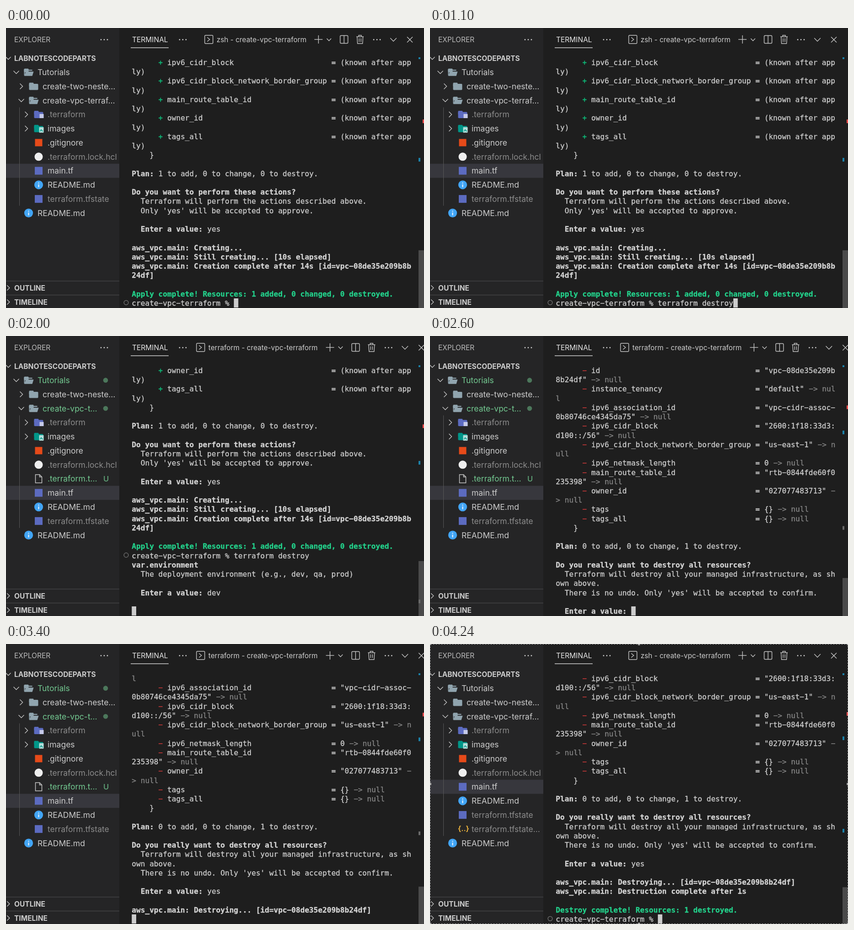
Recreate the animation shown at these times as an HTML page with a canvas. Size 915x612 px, loop 4.39 s.

```html
<!DOCTYPE html>
<html lang="en">
<head>
<meta charset="utf-8">
<title>Terminal session</title>
<style>
  html, body { margin: 0; width: 100%; height: 100%; overflow: hidden; background: #1e1e1e; }
  canvas { display: block; }
</style>
</head>
<body>
<canvas id="stage" width="915" height="612"></canvas>
<script>
const W = 915, H = 612, LOOP = 4390;
const ctx = document.getElementById('stage').getContext('2d');
const SANS = 'Inter, "Open Sans", sans-serif';
const MONO = '"DejaVu Sans Mono", "Liberation Mono", monospace';

// Terminal grid
const COLS = 63, ROWS = 27, CELL = 9.717, LINE = 20.23, LEFT = 275.3, TOP = 65;
const STYLES = {
  n: ['', '#d0d0d0'], b: ['bold ', '#d4d4d4'], g: ['bold ', '#23d18b'],
  p: ['', '#0dbc79'], r: ['', '#d23b3b'], d: ['', '#868686']
};

// Markup: "§" and a letter switch the text style.
const bold = s => `§b${s}§n`;
const ID = 'vpc-08de35e209b8b24df';
const PROMPT = 'create-vpc-terraform % ';
const ASK = `  ${bold('Enter a value:')} `;
const attr = (sign, name, value) => `      ${sign}§n ${name.padEnd(36)} = ${value}\n`;
const added = name => attr('§p+', name, '(known after apply)');
const removed = (name, value) => attr('§r-', name, `${value} §d-> null§n`);

const created =
  ['ipv6_cidr_block', 'ipv6_cidr_block_network_border_group', 'main_route_table_id',
    'owner_id', 'tags_all'].map(added).join('') +
  `    }\n\n${bold('Plan:')} 1 to add, 0 to change, 0 to destroy.\n\n` +
  bold('Do you want to perform these actions?') + '\n' +
  '  Terraform will perform the actions described above.\n' +
  "  Only 'yes' will be accepted to approve.\n\n" + ASK + 'yes\n\n' +
  bold('aws_vpc.main: Creating...') + '\n' +
  bold('aws_vpc.main: Still creating... [10s elapsed]') + '\n' +
  bold(`aws_vpc.main: Creation complete after 14s [id=${ID}]`) + '\n\n' +
  '§gApply complete! Resources: 1 added, 0 changed, 0 destroyed.§n\n' + PROMPT;

const destroyPlan =
  removed('id', `"${ID}"`) +
  removed('instance_tenancy', '"default"') +
  removed('ipv6_association_id', '"vpc-cidr-assoc-0b80746ce4345da75"') +
  removed('ipv6_cidr_block', '"2600:1f18:33d3:d100::/56"') +
  removed('ipv6_cidr_block_network_border_group', '"us-east-1"') +
  removed('ipv6_netmask_length', '0') +
  removed('main_route_table_id', '"rtb-0844fde60f0235398"') +
  removed('owner_id', '"027077483713"') +
  removed('tags', '{}') + removed('tags_all', '{}') +
  `    }\n\n${bold('Plan:')} 0 to add, 0 to change, 1 to destroy.\n\n` +
  bold('Do you really want to destroy all resources?') + '\n' +
  '  Terraform will destroy all your managed infrastructure, as shown above.\n' +
  "  There is no undo. Only 'yes' will be accepted to confirm.\n\n" + ASK;

// Output and keystrokes as [time, text]
const script = [[0, created]];
function type(text, start, end) {
  const steps = (end - start) / 100 + 1;
  for (let i = 0; i < steps; i++) {
    const at = k => Math.ceil(text.length * k / steps);
    script.push([start + i * 100, text.slice(at(i), at(i + 1))]);
  }
}
const print = (time, text) => script.push([time, text]);

type('terraform destroy', 100, 1100);
print(1200, '\n');
print(1300, bold('var.environment') + '\n' +
  '  The deployment environment (e.g., dev, qa, prod)\n\n' + ASK);
type('dev', 1400, 1600);
print(1700, '\n\n');
print(2100, bold(`aws_vpc.main: Refreshing state... [id=${ID}]`) + '\n');
print(2600, destroyPlan);
type('yes', 2700, 2900);
print(3100, '\n\n');
print(3300, bold(`aws_vpc.main: Destroying... [id=${ID}]`) + '\n');
print(3500, bold('aws_vpc.main: Destruction complete after 1s') + '\n');
print(3600, '\n§gDestroy complete! Resources: 1 destroyed.§n\n' + PROMPT);

// Turns markup into rows of styled runs, wrapped at the terminal width.
function layout(text) {
  const rows = [];
  let style = 'n', row, col;
  const newRow = () => { row = []; col = 0; rows.push(row); };
  newRow();
  for (let i = 0; i < text.length; i++) {
    const ch = text[i];
    if (ch === '§') { style = text[++i]; continue; }
    if (ch === '\n') { newRow(); continue; }
    if (col === COLS) newRow();
    let run = row[row.length - 1];
    if (!run || run.style !== style) row.push(run = { col, style, text: '' });
    run.text += ch;
    col++;
  }
  return { rows, col };
}

// Drawing helpers
function rect(x, y, w, h, color) {
  ctx.fillStyle = color;
  ctx.fillRect(x, y, w, h);
}
function text(s, x, y, font, color) {
  ctx.font = font;
  ctx.fillStyle = color;
  ctx.fillText(s, x, y);
}
// Terminal text: slightly heavier, with wide hyphens
function mono(s, x, y, weight, color) {
  const wide = s.replace(/-/g, '\u2212');
  text(wide, x, y, `${weight}16.14px ${MONO}`, color);
  ctx.strokeStyle = color;
  ctx.lineWidth = 0.3;
  ctx.strokeText(wide, x, y);
}
function disc(x, y, r, color) {
  ctx.fillStyle = color;
  ctx.beginPath();
  ctx.arc(x, y, r, 0, 7);
  ctx.fill();
}
function path(points, color = '#c5c5c5', width = 1.4, closed = false) {
  ctx.strokeStyle = color;
  ctx.lineWidth = width;
  ctx.beginPath();
  points.forEach(([x, y]) => ctx.lineTo(x, y));
  if (closed) ctx.closePath();
  ctx.stroke();
}
function box(x, y, w, h, r) {
  ctx.strokeStyle = '#c5c5c5';
  ctx.lineWidth = 1.4;
  ctx.beginPath();
  ctx.roundRect(x, y, w, h, r);
  ctx.stroke();
}
function block(x, y, w, h, r, color) {
  ctx.fillStyle = color;
  ctx.beginPath();
  ctx.roundRect(x, y, w, h, r);
  ctx.fill();
}
const down = (x, y, s) => path([[x - s, y - s / 2], [x, y + s / 2], [x + s, y - s / 2]]);
const right = (x, y, s) => path([[x - s / 2, y - s], [x + s / 2, y], [x - s / 2, y + s]]);
function dots(x, y) {
  for (let i = -1; i <= 1; i++) disc(x + i * 7, y, 1.4, '#c5c5c5');
}

// Explorer icons, centred on x, y
function folder(x, y, color, open) {
  block(x - 10, y - 8, 10, 8, 1.5, color);
  if (!open) return block(x - 10, y - 5.5, 20, 13.5, 1.8, color);
  rect(x - 10, y - 5.5, 18, 2.2, color);
  rect(x - 10, y - 6, 2, 13, color);
  ctx.fillStyle = color;
  ctx.beginPath();
  [[-6, -1.5], [11, -1.5], [8, 8], [-9.5, 8]].forEach(([dx, dy]) => ctx.lineTo(x + dx, y + dy));
  ctx.fill();
}
const icons = {
  dir: (x, y) => folder(x, y, '#90a4ae'),
  open: (x, y) => folder(x, y, '#90a4ae', true),
  modules: (x, y) => {
    folder(x, y, '#5c6bc0');
    rect(x + 2, y - 1, 9, 9, '#c5cae9');
  },
  pictures: (x, y) => {
    folder(x, y, '#009688');
    block(x + 1, y - 3, 10, 12, 1, '#b2dfdb');
    path([[x + 3, y + 6], [x + 5.5, y + 2.5], [x + 7, y + 4.5], [x + 9, y + 6]], '#009688', 1.6);
  },
  git: (x, y) => rect(x - 8, y - 8, 16, 16, '#e64a19'),
  lock: (x, y) => disc(x, y, 9, '#eeeeee'),
  tf: (x, y) => rect(x - 8.5, y - 8.5, 17, 17, '#5c6bc0'),
  info: (x, y) => {
    disc(x, y, 9.6, '#42a5f5');
    rect(x - 1, y - 5, 2, 2, '#f2f6fa');
    rect(x - 1, y - 1, 2, 6, '#f2f6fa');
  },
  file: (x, y) => {
    path([[x - 7, y - 9], [x + 2, y - 9], [x + 7, y - 4], [x + 7, y + 9], [x - 7, y + 9]], '#c5c5c5', 1.5, true);
    path([[x + 2, y - 9], [x + 2, y - 4], [x + 7, y - 4]], '#c5c5c5', 1.5);
  },
  json: (x, y) => text('{..}', x - 10.5, y + 5, 'bold 15.5px ' + SANS, '#e5ae3c')
};

const PLAIN = '#cccccc', FAINT = '#8c8c8c', FRESH = '#73c991';

function explorer(t) {
  const locked = t >= 1800 && t < 3600, backup = t >= 3600;
  const changed = t >= 1800 && t < 3700;
  const label = changed ? FRESH : PLAIN;
  const items = [
    ['open', 0, 'Tutorials', label, 'down'],
    ['dir', 1, 'create-two-neste…', PLAIN, 'right'],
    ['open', 1, changed ? 'create-vpc-t…' : 'create-vpc-terraf…', label, 'down'],
    ['modules', 2, '.terraform', FAINT, 'right'],
    ['pictures', 2, 'images', PLAIN, 'right'],
    ['git', 2, '.gitignore', PLAIN],
    ['lock', 2, '.terraform.lock.hcl', FAINT],
    ['tf', 2, 'main.tf', PLAIN],
    ['info', 2, 'README.md', PLAIN],
    ['tf', 2, 'terraform.tfstate', FAINT],
    ['info', 0, 'README.md', PLAIN]
  ];
  if (locked) items.splice(7, 0, ['file', 2, '.terraform.t…', FRESH]);
  if (backup) items.splice(10, 0, ['json', 2, 'terraform.tfstate…', FAINT]);

  ctx.save();
  ctx.beginPath();
  ctx.rect(0, 0, 248, H);
  ctx.clip();
  rect(0, 0, 248, H, '#252526');
  text('EXPLORER', 18, 31, '15.5px ' + SANS, '#bbbbbb');
  dots(215, 25.5);
  const head = 'bold 15.5px ' + SANS;
  down(5, 66, 5.5);
  text('LABNOTESCODEPARTS', 18, 71.5, head, PLAIN);

  items.forEach(([icon, depth, name, color, arrow], i) => {
    const y = 65.9 + 30.77 * (i + 1), x = 49.5 + depth * 11;
    if (name === 'main.tf') rect(0, y - 15.4, 248, 30.8, '#37373d');
    if (arrow === 'down') down(x - 27, y, 6);
    if (arrow === 'right') right(x - 27, y, 6);
    icons[icon](x, y);
    text(name, x + 19.5, y + 6.4, '17.5px ' + SANS, color);
    if (changed && arrow === 'down') disc(218, y, 5.3, '#4c775b');
    if (icon === 'file') text('U', 213, y + 6.2, '500 16.5px ' + SANS, '#63ab7c');
  });
  rect(29, 173.5, 1, locked || backup ? 246 : 215, '#585858');

  rect(0, 552.5, 248, 1.2, '#48484a');
  rect(0, 583, 248, 1.2, '#48484a');
  [['OUTLINE', 568], ['TIMELINE', 599]].forEach(([name, y]) => {
    right(5, y, 5.5);
    text(name, 18, y + 5.6, head, PLAIN);
  });
  ctx.restore();
}

function header(t) {
  const busy = t >= 1300 && t < 3600;
  text('TERMINAL', 276, 31, '15.5px ' + SANS, '#e7e7e7');
  rect(273, 42.5, 83, 1.3, '#e7e7e7');
  dots(387, 25.5);

  const x = busy ? 416.5 : 434.5;
  box(x + 0.5, 16, 18, 18, 2);
  path([[x + 6, 20.5], [x + 11.5, 25], [x + 6, 29.5]]);
  text((busy ? 'terraform' : 'zsh') + ' - create-vpc-terraform', x + 26.5, 30.6, '15.4px ' + SANS, PLAIN);

  ctx.save();
  ctx.translate(busy ? 25.3 : 0, 0);
  path([[675, 25], [693, 25]]);
  path([[684, 16], [684, 34]]);
  down(707, 25.5, 4.8);
  box(731.5, 16.5, 17, 17, 2);
  path([[740, 16.5], [740, 33.5]]);
  path([[767, 19], [783, 19]]);
  path([[772, 19], [772, 16], [778, 16], [778, 19]]);
  path([[768.5, 19], [769.5, 34], [780.5, 34], [781.5, 19]]);
  path([[773, 22.5], [773, 30.5]]);
  path([[777, 22.5], [777, 30.5]]);
  dots(812, 25.5);
  down(848, 25.5, 6.8);
  path([[878, 19.5], [890, 31.5]]);
  path([[890, 19.5], [878, 31.5]]);
  ctx.restore();
}

function terminal(t) {
  const { rows, col } = layout(script.filter(([at]) => at <= t).map(([, s]) => s).join(''));
  rows.slice(-ROWS).forEach((row, i) => {
    const y = TOP + i * LINE;
    row.forEach(run => mono(run.text, LEFT + run.col * CELL, y + 16, ...STYLES[run.style]));
    if (row[0] && row[0].text.startsWith(PROMPT)) {
      ctx.strokeStyle = '#6e6e6e';
      ctx.lineWidth = 1.5;
      ctx.beginPath();
      ctx.arc(263, y + 9.3, 4.8, 0, 7);
      ctx.stroke();
    }
  });
  rect(LEFT + col * CELL, TOP + (ROWS - 1) * LINE, CELL, 20, '#cccccc');

  // Scrollbar and command marks; the scrollback holds more lines than are drawn.
  const total = rows.length + (t < 2600 ? 91 : 120);
  const at = line => 64 + 547 * line / total;
  const slider = at(total - ROWS);
  rect(903, slider, 12, H - slider, '#4a4a4a');
  rect(903, 64, 4, 4, '#1b81a8');
  rect(903, at(48.3) - 4, 4, 8, '#1b81a8');
  rect(912, at(30.2) - 4, 3, 8, '#f14c4c');
  if (t >= 1200) rect(903, at(117) - 4, 4, 8, t < 3600 ? '#6a6a6a' : '#1b81a8');
}

function marquee() {
  ctx.save();
  ctx.setLineDash([3, 3]);
  path([[0.5, 0.5], [W - 0.5, 0.5], [W - 0.5, H - 0.5], [0.5, H - 0.5]], '#b4b4b4', 1, true);
  ctx.restore();
  for (const x of [0, W / 2, W])
    for (const y of [0, H / 2, H])
      if (x !== W / 2 || y !== H / 2) disc(x, y, 3, '#a8a8a8');
}

function draw(t) {
  rect(0, 0, W, H, '#1e1e1e');
  terminal(t);
  header(t);
  explorer(t);
  if (t >= 4000) marquee();
}

const start = performance.now();
function tick() {
  draw((performance.now() - start) % LOOP);
  requestAnimationFrame(tick);
}
tick();
</script>
</body>
</html>
```
